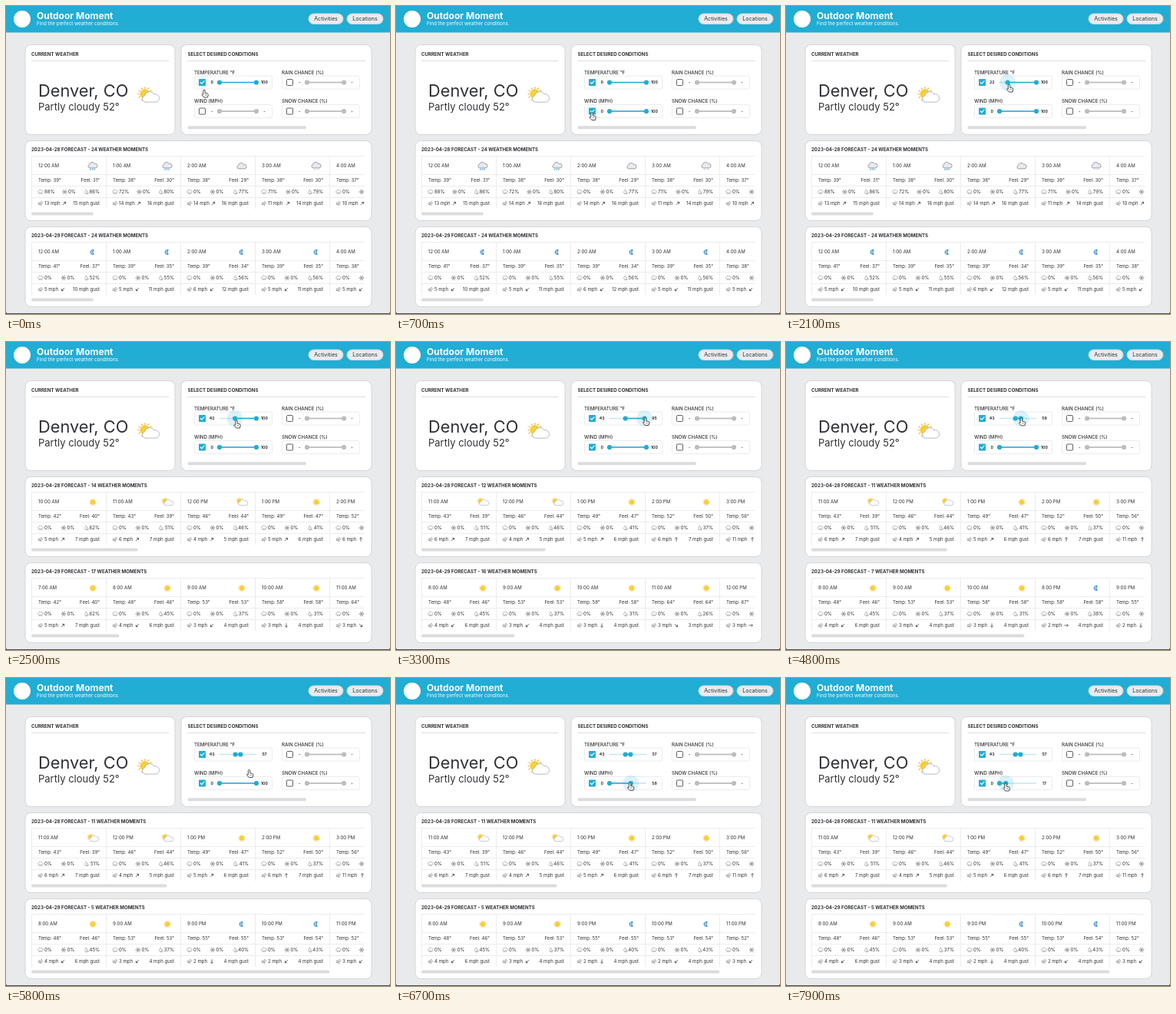
An HTML page that plays this animation: 500 by 401 pixels, repeating every 8 s.

```html
<!DOCTYPE html>
<html lang="en">
<head>
<meta charset="utf-8">
<title>Outdoor Moment</title>
<style>
  html, body { margin: 0; width: 100%; height: 100%; overflow: hidden; background: #e9eaec; }
  svg { display: block; }
  #stage { width: 100%; height: 100%; }
  text { font: 400 6.1px Inter, "Open Sans", "DejaVu Sans", sans-serif; fill: #303236; white-space: pre; }
</style>
</head>
<body>
<svg id="stage" viewBox="0 0 500 401">
  <g id="page"></g>
  <g id="controls"></g>
  <g id="forecasts"></g>
  <g id="cursor">
    <path d="M-1.2 1.2a1.2 1.2 0 0 1 2.4 0v3l3 .7q1.3.4 1.1 1.8l-.8 3.3h-4.6l-3-3.5q.4-1.4 1.9-.3z"
      fill="#fff" stroke="#222" stroke-width=".8" stroke-linejoin="round"/>
    <path d="M1.2 6v2M2.8 6v2" stroke="#444" stroke-width=".5"/>
  </g>
</svg>
<script>
const LOOP = 8000, STEP = 100;
const BLUE = '#21add4', PALE = '#c6e6f0', GREY = '#bdbdbd';
const $ = id => document.getElementById(id);

// Keyframes are [time, value]; values are linear in between.
function track(keys, t) {
  const next = keys.findIndex(k => k[0] > t);
  if (next < 0) return keys[keys.length - 1][1];
  if (next === 0) return keys[0][1];
  const [t0, a] = keys[next - 1], [t1, b] = keys[next];
  return a + (b - a) * (t - t0) / (t1 - t0);
}
const TEMP_LOW = [[1500, 0], [2100, 22], [2400, 41], [2600, 43]];
const TEMP_HIGH = [[3200, 100], [3300, 95], [3700, 76], [4200, 60], [4300, 59], [4500, 59], [4600, 58], [4900, 58], [5000, 57]];
const WIND_HIGH = [[6200, 100], [6300, 96], [6700, 58], [7100, 29], [7900, 17]];
const CURSOR_X = [[100, 258], [500, 255], [700, 255], [1500, 280], [2100, 290.5], [2400, 299.5], [2600, 300.5],
  [2750, 300.5], [3100, 326], [3300, 324.5], [3700, 315], [4200, 307.5], [5000, 306], [5300, 306],
  [6200, 325], [6300, 323], [6700, 304.5], [7100, 291], [7900, 286]];
const CURSOR_Y = [[100, 109], [500, 138], [700, 138.5], [1500, 101], [2100, 102], [2750, 102], [3100, 98.5],
  [5300, 99], [6200, 136], [7900, 137]];

// Drawing helpers
const text = (x, y, s, size = 6.1, attrs = '') =>
  `<text x="${x}" y="${y}" style="font-size:${size}px;${attrs}">${s}</text>`;
const BOLD = 'font-weight:700;', MEDIUM = 'font-weight:500;', WHITE = 'fill:#fff;';
const END = 'text-anchor:end;', MID = 'text-anchor:middle;';
const rect = (x, y, w, h, fill, r = 0, stroke = 'none') =>
  `<rect x="${x}" y="${y}" width="${w}" height="${h}" rx="${r}" fill="${fill}" stroke="${stroke}"/>`;
const line = (x1, y1, x2, y2, color, w = 1) =>
  `<path d="M${x1} ${y1}L${x2} ${y2}" stroke="${color}" stroke-width="${w}"/>`;
const dot = (x, y, r, fill) => `<circle cx="${x}" cy="${y}" r="${r}" fill="${fill}"/>`;
const stroke = (d, color, w = .6) =>
  `<path d="${d}" fill="none" stroke="${color}" stroke-width="${w}" stroke-linecap="round"/>`;
const at = (x, y, body, scale = 1, turn = 0) =>
  `<g transform="translate(${x} ${y}) rotate(${turn}) scale(${scale})">${body}</g>`;
const card = (x, y, w, h) => rect(x, y, w, h, '#fff', 7.5, '#d3d6d9');
const rays = (n, r0, r1) => Array.from({ length: n }, (_, i) => {
  const a = i * 2 * Math.PI / n, c = Math.cos(a), s = Math.sin(a);
  return `M${c * r0} ${s * r0}L${c * r1} ${s * r1}`;
}).join('');

// Icons, centred on the origin
const cloud = (fill = '#e9eaee', edge = '#777b82', w = .7) =>
  `<path d="M-4 3.4a2.3 2.3 0 0 1-.4-4.5a3.6 3.6 0 0 1 6.7-1.2a2.9 2.9 0 0 1 1.7 5.7z" fill="${fill}" stroke="${edge}" stroke-width="${w}"/>`;
const sun = stroke(rays(12, 3.6, 4.5), '#f4c23a', .7) + dot(0, 0, 2.9, '#fcd22e') +
  '<circle r="2.8" fill="none" stroke="#f0b323" stroke-width=".5"/>';
const ICONS = {
  cloud: cloud(),
  rain: at(0, -1, cloud()) + stroke('M-2.7 3.5l-.6 1.5M-.2 3.5l-.6 1.5M2.2 3.5l-.6 1.5', '#3593cf', .9),
  snow: at(0, -1, cloud()) + stroke('M-2.5 4.2h.1M0 4.8h.1M2.4 4.2h.1', '#8fa8ba', 1),
  sun,
  partly: at(-3, -1.5, sun, .95) + at(1.8, .7, cloud('#fff', '#90959d', .5)),
  moon: '<path d="M1.4-2.7a3 3 0 1 0 0 5.4a3.3 3.3 0 0 1 0-5.4z" fill="#a9d5f1" stroke="#1c79bd" stroke-width=".9"/>',
};
const SMALL = {
  rain: at(0, -.6, cloud('#fff', '#777', .9), .55) + stroke('M-1.5 2l-.2.7M0 2l-.2.7M1.5 2l-.2.7', '#777', .5),
  flake: stroke(rays(6, 0, 3.3), '#70747a', .5) + stroke(rays(6, 2, 2.3), '#70747a', .9),
  humid: stroke('M-.7-2.8q2.6 3.2 1.2 4.7q-1.3 1-2.5 0q-1.3-1.4 1.3-4.7M1.3-.2q2.2 2.2.8 2.7h-3', '#777', .5),
  wind: stroke('M-2.8-1h3.5q1.3-.3.7-1.4q-.7-.5-1.1.2M-2.8.3h5q1-.3.6-1.2M-2.8 1.5h3.3q1.1.4.4 1.2q-.6.3-.9-.2', '#777'),
  arrow: stroke('M-2.3 0h4.6M.8-1.5l1.5 1.5l-1.5 1.5', '#33363a', .7),
};
const COMPASS = '→↘↓↙←↖↑↗';

// Weather by hour. Detail: feel, rain, humidity, wind, gust, direction, icon
const DAYS = [
  {
    date: '2023-04-28', y: 176, night: 'cloud',
    temps: [39, 38, 38, 38, 37, 36, 36, 37, 38, 40, 42, 43, 46, 49, 52, 56, 59, 57, 55, 52, 49, 46, 44, 42],
    detail: {
      0: '31 88 86 13 15 ↗ rain', 1: '30 72 80 14 16 ↗ rain', 2: '29 0 77 14 16 ↗ cloud',
      3: '30 71 79 11 14 ↗ snow', 4: '30 0 79 10 14 ↗ cloud',
      11: '39 0 51 6 7 ↗ partly', 12: '44 0 46 4 5 ↗ partly', 13: '47 0 41 5 6 ↗ sun',
      14: '50 0 37 6 7 ↑ sun', 15: '54 0 33 11 13 ↑ sun',
    },
  },
  {
    date: '2023-04-29', y: 288, night: 'moon',
    temps: [41, 39, 39, 39, 38, 37, 38, 42, 48, 53, 58, 64, 67, 70, 72, 73, 73, 71, 67, 62, 58, 55, 53, 52],
    detail: {
      0: '37 0 52 5 10 ↙ moon', 1: '35 0 55 5 11 ↙ moon', 2: '34 0 56 6 12 ↙ moon',
      3: '35 0 56 5 11 ↙ moon', 4: '34 0 57 5 10 ↙ moon',
      8: '46 0 45 4 6 ↙ sun', 9: '53 0 37 3 4 ↙ sun', 10: '58 0 31 3 4 ↓ sun',
      11: '64 0 26 3 3 ↘ sun', 12: '67 0 24 3 4 → sun',
      20: '58 0 38 2 4 → moon', 21: '55 0 40 2 4 ↓ moon', 22: '54 0 43 2 4 ↙ moon', 23: '52 0 45 3 4 ↙ moon',
    },
  },
];
const plainDetail = (day, hour, temp) =>
  `${temp - 2} 0 ${Math.max(20, 104 - temp)} 5 7 ↗ ${hour > 6 && hour < 20 ? 'sun' : day.night}`;

function hourColumn(day, hour, x) {
  const temp = day.temps[hour];
  const [feel, rain, humidity, wind, gust, direction, icon] =
    (day.detail[hour] || plainDetail(day, hour, temp)).split(' ');
  const clock = `${hour % 12 || 12}:00 ${hour < 12 ? 'AM' : 'PM'}`;
  const flakeX = 40.5 + 1.5 * rain.length, arrowX = 39 + 2 * wind.length;
  return at(x, 0,
    line(97.5, 0, 97.5, 69, '#ececee') +
    text(9, 15.2, clock) + at(80, 13.5, ICONS[icon]) +
    text(9, 34.2, `Temp: ${temp}°`) + text(89, 34.2, `Feel: ${feel}°`, 6.1, END) +
    at(12, 47, SMALL.rain) + text(17, 49.2, rain + '%') +
    at(flakeX, 47, SMALL.flake) + text(flakeX + 4.5, 49.2, '0%') +
    at(72, 47, SMALL.humid) + text(89, 49.2, humidity + '%', 6.1, END) +
    at(12, 62, SMALL.wind) + text(17, 64.2, `${wind} mph`) +
    at(arrowX, 62, SMALL.arrow, 1, COMPASS.indexOf(direction) * 45) +
    text(89, 64.2, `${gust} mph gust`, 6.1, END));
}

function forecast(day, low, high) {
  const hours = day.temps.map((_, h) => h).filter(h => day.temps[h] >= low && day.temps[h] <= high);
  const bar = Math.min(434, 434 * 434 / (97 * hours.length));
  const columns = hours.slice(0, 5).map((h, i) => hourColumn(day, h, i * 97)).join('');
  const rules = [.5, 24.5, 39.5, 54.5].map(y => line(0, y, 434, y, '#ececee')).join('');
  return at(0, day.y,
    card(25, -.5, 451, 104) +
    text(33, 13.2, `${day.date} FORECAST - ${hours.length} WEATHER MOMENTS`, 6.15, BOLD) +
    `<svg x="33" y="19" width="434" height="69">${rules}${line(.5, 0, .5, 69, '#ececee')}${columns}</svg>` +
    rect(33, 92.5, bar, 4, '#dcdcde', 2));
}

function control(x, y, label, { on = false, low = 0, high = 100, halo = '', boxHalo = 0 } = {}) {
  const mid = y + 13, color = on ? BLUE : GREY;
  const place = v => x + 33 + .48 * v;
  const left = place(on ? low : 0), right = place(on ? high : 100);
  const box = on
    ? rect(x + 6, mid - 4.5, 9, 9, BLUE, 1) + stroke(`M${x + 8.2} ${mid}l1.7 1.7l3.2-3.5`, '#fff', 1.1)
    : rect(x + 6.5, mid - 4, 8, 8, '#fff', 1, '#5c5f64');
  const glow = halo ? `<g opacity=".16">${dot(halo === 'low' ? left : right, mid, 10.5, BLUE)}</g>` : '';
  return text(x, y + 2.4, label, 6.15, MEDIUM) +
    rect(x + .5, y + 4.5, 101, 17, '#fff', 2, '#ececee') +
    (boxHalo ? `<g opacity="${boxHalo}">${dot(x + 10.5, mid, 9, BLUE)}</g>` : '') + box +
    text(x + 23.2, mid + 1.9, on ? Math.round(low) : '-', 5.2, BOLD + MID) +
    text(x + 91.5, mid + 1.9, on ? Math.round(high) : '-', 5.2, BOLD + MID) +
    line(place(0), mid, place(100), mid, on ? PALE : '#d2d2d2', 1.3) +
    line(left, mid, right, mid, color, 1.6) + glow +
    dot(left, mid, 3.1, color) + dot(right, mid, 3.1, color);
}

function page() {
  const pill = (x, w, label) =>
    rect(x, 10, w, 13.5, '#e9ebed', 6.75, '#cdd3d6') + text(x + w / 2, 19.2, label, 7.1, MID);
  return rect(0, 0, 500, 401, '#e9eaec') + rect(0, 0, 500, 34.5, BLUE) +
    dot(21, 17, 11, '#fff') +
    text(40, 17.2, 'Outdoor Moment', 12, BOLD + WHITE) +
    text(40, 25.2, 'Find the perfect weather conditions.', 6.3, WHITE) +
    pill(394, 45, 'Activities') + pill(444, 47, 'Locations') +
    card(25, 50.5, 195, 117) + text(33, 64.6, 'CURRENT WEATHER', 6.15, BOLD) + line(33, 71.5, 212, 71.5, '#dedfe1') +
    text(42, 118.3, 'Denver, CO', 21.8) +
    text(42, 135.6, 'Partly cloudy 52°', 13) +
    at(181, 114.6, sun, 2) + at(188.5, 119, cloud('#fff', '#a4a9b1', .45), 1.8) +
    card(228, 50.5, 248, 117) + text(236.5, 64.6, 'SELECT DESIRED CONDITIONS', 6.15, BOLD) +
    line(236, 71.5, 468, 71.5, '#dedfe1') + rect(236.5, 156.3, 154.5, 4, '#dcdcde', 2) +
    control(359, 86.5, 'RAIN CHANCE (%)') + control(359, 124, 'SNOW CHANCE (%)') +
    rect(0, 400, 500, 1, '#4b4c4e') + stroke('M0 399q0 2 2 2M500 399q0 2-2 2', '#4b4c4e', 1);
}

const shown = {};
function show(id, markup) {
  if (shown[id] !== markup) $(id).innerHTML = shown[id] = markup;
}

function render(t) {
  const low = Math.round(track(TEMP_LOW, t)), high = Math.round(track(TEMP_HIGH, t));
  const tempHalo = t >= 1400 && t < 2800 ? 'low' : t >= 3000 && t < 5200 ? 'high' : '';
  show('controls',
    control(245, 86.5, 'TEMPERATURE °F', { on: true, low, high, halo: tempHalo, boxHalo: t < 200 ? .07 : 0 }) +
    control(245, 124, 'WIND (MPH)', {
      on: t >= 500, high: track(WIND_HIGH, t),
      halo: t >= 6100 ? 'high' : '', boxHalo: t >= 400 && t < 900 ? .07 : 0,
    }));
  show('forecasts', DAYS.map(day => forecast(day, low, high)).join(''));
  $('cursor').setAttribute('transform', `translate(${track(CURSOR_X, t)} ${track(CURSOR_Y, t)})`);
}

show('page', page());
const start = performance.now();
function tick() {
  const t = (performance.now() - start) % LOOP;
  render(Math.floor(t / STEP) * STEP);
  requestAnimationFrame(tick);
}
tick();
</script>
</body>
</html>
```
